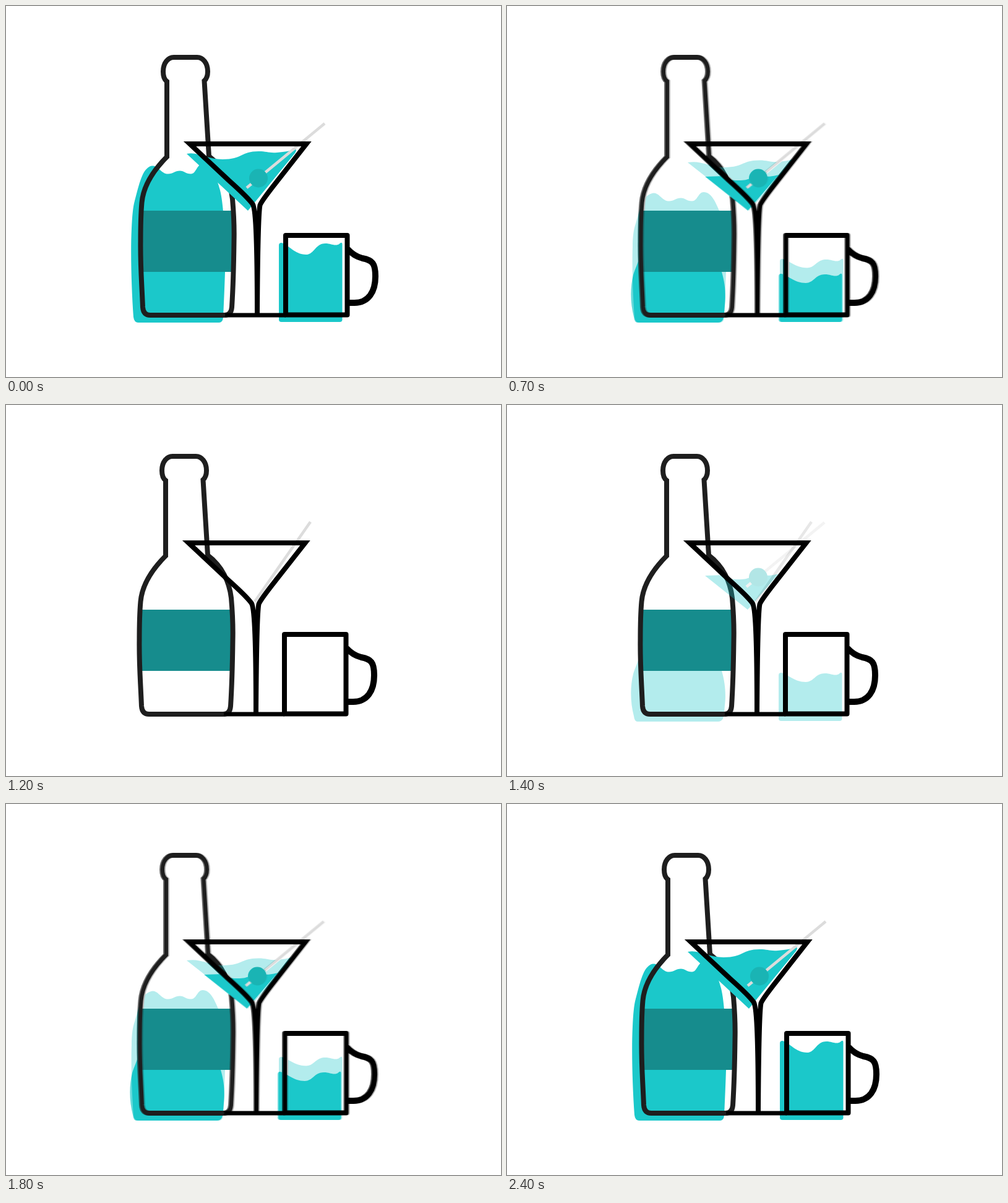
Animation, 800 px wide and 600 px high, one loop 2.8 s. Source, as an HTML page:

```html
<!DOCTYPE html>
<html lang="en">
<head>
<meta charset="utf-8">
<title>Drinks</title>
<style>
  html, body { margin: 0; width: 100%; height: 100%; overflow: hidden; background: #fff; }
  svg { display: block; width: 100%; height: 100%; }
  .drink { fill: #1bc8ca; }
  .label { fill: #168c8d; }
  .olive { fill: #1ab4b4; }
  .stick { stroke: #dcdcdc; stroke-width: 4.6; }
  .line { fill: none; stroke: #000; stroke-width: 8; }
  .bottle { stroke: #1e1e1e; }
  .round { stroke-linejoin: round; }
  .base { stroke-width: 7; }
  .handle { stroke-width: 10; }
</style>
</head>
<body>
<svg id="stage" viewBox="0 0 800 600"></svg>
<script>
const path = (cls, d) => `<path class="${cls}" d="${d}"/>`;

const bottle = `M260 122 C254.500 118 254 111 254 106 C254 92 262 83 271 83 H309
  C318 83 326 92 326 106 C326 112 325 117 320.500 121 L328 243
  C351 260 363 286 366 312 C368 335 369 360 368.500 380 C368 420 367 455 365 487
  Q364 500 353 500 H233 Q222 500 221 487 C219 440 217 420 217.500 380
  C217.500 355 218 335 219.500 318 C222 290 240 264 260 244 Z`;
const glass = `M406 497 C406 390 404 330 399 321 C395 315 379 299 360 282 L297 223
  H485.500 L440 281 C425 300 413 315 410.500 322 C408 335 406.500 420 406 497`;
const handle = `M552 393 C560 402 568 406 576 408 C592 411 597 416 597 437
  C597 462 586 480 563 480 H552`;

const bottleEnd = "C353 460 352 480 351 504 Q350 512 344 512 H214 Q207 512 206 503 Z";

// Bottle surface: two crests with ripples between them
const ripples = y => `237 ${y} C247 ${y} 250 ${y + 13} 262 ${y + 13}
  C270 ${y + 13} 273 ${y + 8} 281 ${y + 8} C288 ${y + 8} 290 ${y + 13} 299 ${y + 13}`;

// Mug drink with its top at y and a trough of depth d
const mugDrink = (y, d) => `M441 ${y + 4} Q441 ${y} 445 ${y}
  C456 ${y + 2} 466 ${y + d} 485 ${y + d} C498 ${y + d} 500 ${y + 1} 516 ${y + 1}
  C524 ${y + 1} 526 ${y + 3.5} 533 ${y + 3.5} C538 ${y + 3.5} 539 ${y + 1} 541 ${y}
  Q543.500 ${y - 1} 543.500 ${y + 3} V507 Q543.500 511 539.500 511 H445 Q441 511 441 507 Z`;

const levels = [
  {
    bottle: `M206 503 C203 460 201 400 203 360 C204 340 205 326 208 315
      C213 296 216 284 220 275 C224 265 231 258 ${ripples(258.5)}
      C307 271.500 308 257 318 254 C330 252 340 275 346 298
      C352 322 355 380 354 430 ${bottleEnd}`,
    glass: `M292 239 C310 235 325 248 350 248 C382 248 380 235 408 235
      C422 235 424 238 438 237 C452 236 458 234 469 232 C469 237 466 239 463 243 L391 331 Z`,
    mug: mugDrink(383, 19)
  },
  {
    bottle: `M206 503 C203 460 202 420 203 390 C203 372 205 360 208 352
      C212 338 215 325 220 314 C226 306 232 303 ${ripples(302.5)}
      C308 315.500 309 301 318 301 C330 301 337 317 343 331
      C351 355 356 395 354 430 ${bottleEnd}`,
    glass: `M292 253 C315 249 328 261 350 261 C382 261 380 249.500 408 249.500
      C422 249.500 424 253 438 252 C452 251 458 249 468 246 C468 250 464 252 461 255 L391 331 Z`,
    mug: mugDrink(409, 14.5)
  },
  {
    dx: -2,
    bottle: `M207 503 C201 480 201 455 206 435 C208 428 211 422 214 413 L222 398 H334 L349 430
      C355 450 356 470 354 485 C353.500 492 353 498 352 504
      Q350 512 343 512 H213 Q208 512 207 503 Z`,
    glass: `M322 276 L352 275 C356 280 362 282 376 282 C398 282 388 277 410 276
      C424 276 430 276 441 273 L391 331 Z`,
    mug: mugDrink(433, 15)
  },
  { dx: -2 }
];

function scene({ dx = 0, bottle: inBottle, glass: inGlass, mug }) {
  const full = !!mug;
  return `<g><rect width="800" height="600" fill="#fff"/><g transform="translate(${dx} 0)">` +
    (full ? path("drink", inBottle) : "") +
    `<rect class="label" x="219" y="331" width="148" height="99"/>` +
    path("line bottle", bottle) +
    (full
      ? path("drink", inGlass) + path("drink", mug) + path("stick", "M515 190 L389 294") +
        `<circle class="olive" cx="408" cy="278.500" r="15"/>`
      : path("stick", "M494 189 L404 318")) +
    path("line", glass) +
    path("line base", "M354 500 H452") +
    path("line handle", handle) +
    path("line round", "M452 371 H551.500 V499.500 H452 Z") +
    "</g></g>";
}

const stage = document.getElementById("stage");
stage.innerHTML = levels.map(scene).join("");
const scenes = [...stage.children];

const LOOP = 2800, STEP = 100;
// Start of each three-step fade and its direction
const fades = [[200, 1], [600, 1], [1000, 1], [1400, -1], [1800, -1], [2200, -1]];
const clamp = (v, lo, hi) => Math.min(hi, Math.max(lo, v));

function draw(t) {
  let steps = 0;
  for (const [start, dir] of fades)
    steps += dir * clamp(Math.floor((t - start) / STEP) + 1, 0, 3);
  scenes.forEach((el, i) => {
    el.style.opacity = i ? clamp(steps / 3 - i + 1, 0, 1) : 1;
  });
}

const begin = performance.now();
function tick() {
  draw((performance.now() - begin) % LOOP);
  requestAnimationFrame(tick);
}
tick();
</script>
</body>
</html>
```
